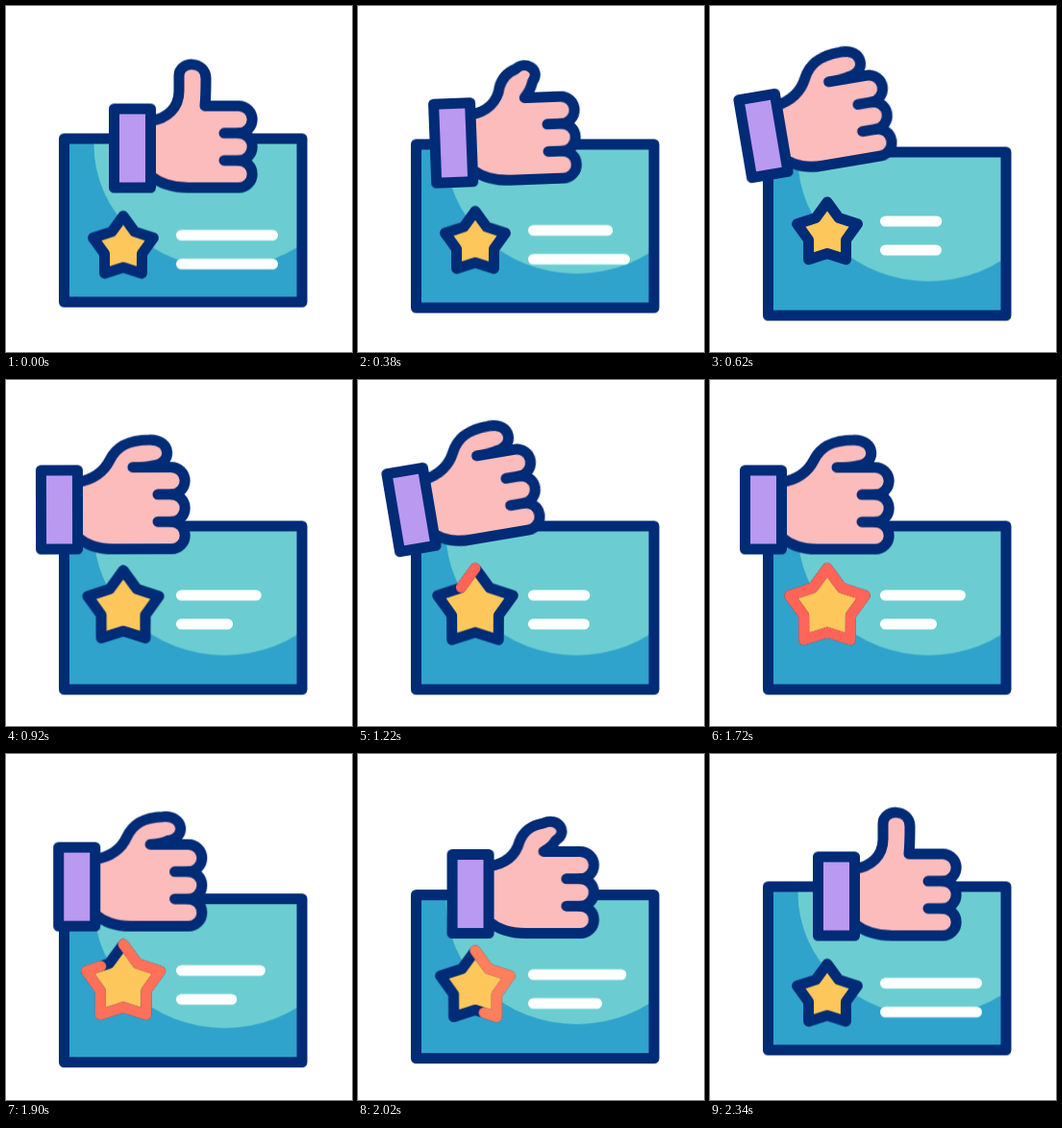
Recreate the animation shown at these times as an HTML page. Size 360 px wide and 360 px high, loop 2.4 s.

```html
<!DOCTYPE html>
<html lang="en">
<head>
<meta charset="utf-8">
<title>Thumbs up card</title>
<style>
  html, body { margin: 0; width: 100%; height: 100%; overflow: hidden; background: #fff; }
  svg { display: block; width: 100vw; height: 100vh; }

  .ink { stroke: #002b76; stroke-width: 11; stroke-linecap: round; stroke-linejoin: round; }
  .line { fill: none; stroke: #fff; stroke-width: 11; stroke-linecap: round; }
  .skin { fill: #fcbcbc; }
  .red { fill: none; stroke: #ff6457; stroke-dasharray: 1 2; }

  .card, .lift, .star, .edge, .line, .move, .knock, .skin, .gaps {
    animation: 2400ms cubic-bezier(.364, 0, .636, 1) infinite;
  }
  .card { animation-name: sink; }
  .lift { animation-name: lift; }
  .star { animation-name: grow; }
  .edge { animation-name: thin; }
  .trim {
    animation-name: thin, trim, tint, show;
    animation-timing-function: cubic-bezier(.364, 0, .636, 1), cubic-bezier(.364, 0, .636, 1), linear, step-end;
  }
  .upper { animation-name: upper; }
  .lower { animation-name: lower; }
  .move { animation-name: move; }
  .knock { animation-name: knock; transform-origin: 131.5px 147.5px; }
  .skin { animation-name: fold; }
  .gaps { animation-name: gaps; fill: none; }

  @keyframes sink {
    0%, 8.333%, 96.667%, 100% { transform: translateY(0); }
    25%, 75% { transform: translateY(14px); }
  }
  @keyframes lift {
    0%, 9.167%, 96.667%, 100% { transform: translateY(0); }
    25.833%, 75% { transform: translateY(-14.5px); }
  }
  @keyframes grow {
    0%, 25%, 96.667%, 100% { transform: scale(1); }
    45.833%, 75% { transform: scale(1.25); }
  }
  /* keeps the outline's weight while the star grows */
  @keyframes thin {
    0%, 25%, 96.667%, 100% { stroke-width: 11; }
    45.833%, 75% { stroke-width: 8.8; }
  }
  /* red outline runs round the star, then clears the same way */
  @keyframes trim {
    0%, 45.833% { stroke-dashoffset: 1; }
    70.833%, 75% { stroke-dashoffset: 0; }
    92.5%, 100% { stroke-dashoffset: -1; }
  }
  @keyframes tint {
    0%, 75% { stroke: #ff6457; }
    92.5%, 100% { stroke: #ff955f; }
  }
  @keyframes show {
    0%, 92.5%, 100% { visibility: hidden; }
    46.2% { visibility: visible; }
  }
  @keyframes upper {
    0%, 8.333%, 88.333%, 100% { d: path("M182.5 238H277.5"); }
    25%, 50% { d: path("M182.5 238H235.5"); }
    37.5%, 62.5%, 75% { d: path("M182.5 238H260.5"); }
  }
  @keyframes lower {
    0%, 16.667%, 96.667%, 100% { d: path("M182.5 268H277.5"); }
    25%, 50% { d: path("M182.5 268H235.5"); }
    37.5%, 62.5%, 75% { d: path("M182.5 268H230.5"); }
  }
  @keyframes move {
    0%, 8.333%, 87.917%, 100% { transform: translate(0, 0); }
    25%, 75% { transform: translate(-76px, -13px); }
  }
  @keyframes knock {
    0%, 11.667%, 37.5%, 62.5%, 100% { transform: rotate(0deg); }
    25%, 50% { transform: rotate(-9.7deg); }
  }
  @keyframes fold {
    0%, 8.333%, 96.667%, 100% {
      d: path("M150 119C168 117 180 105 180 88C180 82 180 78 180 72C180 56 208 56 208 75C208 85 208 94 207 103L207 103.4L242 103.4A14.2 14.2 0 0 1 242 131.8A14.2 14.2 0 0 1 242 160.2A14.2 14.2 0 0 1 242 188.6L190 188.6C172 188.6 160 184 150 176");
    }
    25%, 75% {
      d: path("M150 119C168 116 178 108 184 96C191 82 203 75 225 75C249 74 250 101 228 102C224 103 218 103.4 208 103.4L208 103.4L248 103.4A14.2 14.2 0 0 1 248 131.8A14.2 14.2 0 0 1 248 160.2A14.2 14.2 0 0 1 248 188.6L188 188.6C170 188.6 160 184 150 176");
    }
  }
  @keyframes gaps {
    0%, 8.333%, 96.667%, 100% { d: path("M227 131.8L242 131.8M227 160.2L242 160.2"); }
    25%, 75% { d: path("M234 131.8L248 131.8M234 160.2L248 160.2"); }
  }
</style>
</head>
<body>
<svg viewBox="0 -0.5 360 360">
  <defs>
    <clipPath id="face"><path d="M60.5 137.5H308V307.5H60.5Z"/></clipPath>
    <path id="outline" pathLength="1" d="M0 -33L-12 -16.6L-31.4 -10.2L-19.5 6.3L-19.4 26.7L0 20.5L19.4 26.7L19.5 6.3L31.4 -10.2L12 -16.6Z"/>
  </defs>

  <g class="card">
    <path fill="#2fa3cb" d="M60.5 137.5H308V307.5H60.5Z"/>
    <ellipse cx="227.5" cy="144" rx="136" ry="128" fill="#6bcdd1" clip-path="url(#face)"/>
    <path class="ink" fill="none" d="M60.5 137.5H308V307.5H60.5Z"/>
  </g>

  <g class="lift">
    <path class="line upper" d="M182.5 238H277.5"/>
    <path class="line lower" d="M182.5 268H277.5"/>
    <g transform="translate(122 251)">
      <g class="star">
        <use href="#outline" class="ink edge" fill="#fdc75b"/>
        <use href="#outline" class="ink red edge trim"/>
      </g>
    </g>
  </g>

  <g class="move">
    <g class="knock">
      <path class="ink skin"/>
      <path class="ink gaps"/>
      <path class="ink" fill="#ba99f0" d="M112.5 106.5H150.5V188.5H112.5Z"/>
    </g>
  </g>
</svg>
</body>
</html>
```
